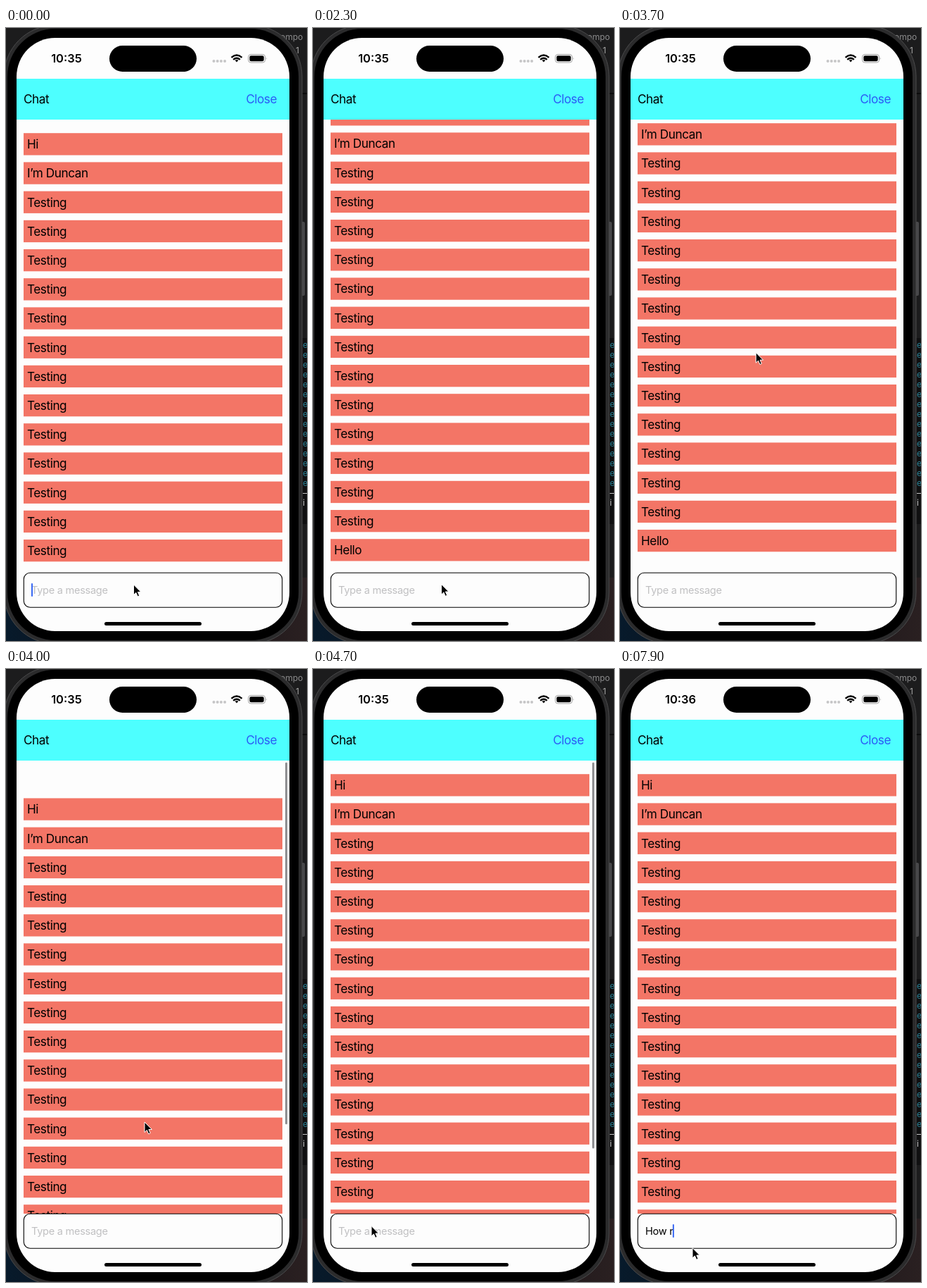
An HTML page for the animation above (8 s loop, 428x870 px).

```html
<!DOCTYPE html>
<html lang="en">
<head>
<meta charset="utf-8">
<title>Chat scroll</title>
<style>
  html, body { margin: 0; width: 100%; height: 100%; overflow: hidden; background: #1c1c1d; }
  svg { display: block; width: 428px; height: 870px; }
  text { white-space: pre; font-family: Inter, "Open Sans", sans-serif; }
  .body { font-size: 17.2px; letter-spacing: -.45px; }
  .field { font-size: 14.6px; letter-spacing: -.3px; }
  .clock { font-size: 16.5px; font-weight: 600; }
  .mono { font: 12px "Noto Sans Mono", "DejaVu Sans Mono", monospace; }
</style>
</head>
<body>
<svg id="stage" viewBox="0 0 428 870" xmlns="http://www.w3.org/2000/svg">
  <defs>
    <clipPath id="view"><rect x="15" y="130" width="388" height="643"/></clipPath>
    <linearGradient id="glow">
      <stop offset="0" stop-color="#071a2b"/>
      <stop offset=".5" stop-color="#120f14"/>
      <stop offset="1" stop-color="#2a2021"/>
    </linearGradient>
  </defs>

  <!-- desktop behind the phone -->
  <rect width="428" height="870" fill="#1c1c1d"/>
  <rect x="400" y="92" width="28" height="2" fill="#0c0c0c"/>
  <rect x="400" y="440" width="28" height="264" fill="#101011"/>
  <rect y="780" width="428" height="90" fill="url(#glow)"/>
  <g id="side" class="mono"></g>

  <!-- phone -->
  <rect x="419" y="275" width="6" height="105" rx="2" fill="#48484a"/>
  <rect x="-3" y="-4" width="424" height="878" rx="73" fill="#2b2b2c" stroke="#4a4a4b"/>
  <rect x="2" y="1" width="414" height="868" rx="68"/>
  <rect x="15" y="14" width="388" height="842" rx="55" fill="#fdfdfd"/>
  <rect x="147" y="25" width="124" height="37" rx="18.5"/>
  <text id="clock" class="clock" x="86" y="49" text-anchor="middle"></text>
  <g fill="#c6c6c7">
    <circle cx="295.5" cy="47" r="2"/><circle cx="300.7" cy="47" r="2"/>
    <circle cx="305.9" cy="47" r="2"/><circle cx="311.1" cy="47" r="2"/>
  </g>
  <g fill="none" stroke="#000" stroke-width="2.4">
    <path d="M320.5 41.8Q328 35.2 335.5 41.8"/>
    <path d="M323.2 44.8Q328 40.6 332.8 44.8"/>
    <path d="M325.6 45.8Q328 44.2 330.4 45.8L328 48.6Z" fill="#000" stroke="none"/>
  </g>
  <rect x="344.5" y="37.5" width="24" height="11.5" rx="3.6" fill="none" stroke="#a0a0a0"/>
  <rect x="346.3" y="39.3" width="20.4" height="7.9" rx="2.2"/>
  <path d="M369.8 41.3q1.8 1.9 0 3.9z" fill="#a0a0a0"/>

  <g clip-path="url(#view)">
    <g id="list"></g>
    <rect id="bar" x="397" y="132.5" width="3" rx="1.5" fill="#8f8f92"/>
  </g>

  <rect x="15" y="72" width="388" height="58" fill="#4dffff"/>
  <text class="body" x="25" y="107">Chat</text>
  <text class="body" x="385" y="107" text-anchor="end" fill="#2b5cf6">Close</text>

  <rect x="25.3" y="773.3" width="367.4" height="49" rx="9" fill="#fdfdfd" stroke="#000" stroke-width="1.1"/>
  <text id="hint" class="field" x="36" y="803" fill="#c0c0c2">Type a message</text>
  <text id="typed" class="field" x="36" y="803"></text>
  <rect id="caret" y="788" width="2" height="19" rx="1" fill="#3868f4"/>
  <rect x="140" y="843" width="138" height="5" rx="2.5"/>
  <path id="mouse" d="M0 0V14.5L3.4 11.4L5.7 16.8L8.2 15.7L5.9 10.5H10.4Z" stroke="#fff" stroke-width="1"/>
</svg>

<script>
const LOOP = 8000, STEP = 100, PITCH = 41.2;
const $ = id => document.getElementById(id);

function add(parent, tag, attrs, text = "") {
  const el = document.createElementNS("http://www.w3.org/2000/svg", tag);
  for (const key in attrs) el.setAttribute(key, attrs[key]);
  el.textContent = text;
  parent.append(el);
  return el;
}

const messages = ["Hi", "I’m Duncan", ...Array(13).fill("Testing"), "Hello"];
const rows = messages.map((message, i) => {
  const row = add($("list"), "g", { transform: `translate(25 ${149.2 + i * PITCH})` });
  add(row, "rect", { width: 368, height: 31.3, fill: "#f37566" });
  add(row, "text", { class: "body", x: 5, y: 22 }, message);
  return row;
});

add($("side"), "text", { x: 390, y: 17, fill: "#8b8b8c" }, "ompo");
add($("side"), "text", { x: 412, y: 36, fill: "#a8a8a8" }, "1");
for (let i = 0; i < 15; i++) add($("side"), "text", { x: 422, y: 454 + i * 14, fill: "#287f93" }, "e");
add($("side"), "text", { x: 422, y: 664, fill: "#c8c8c8" }, "—");
add($("side"), "text", { x: 422, y: 678, fill: "#c8c8c8" }, "i");

// time, then values
const scrollKeys = [[2000, 0], [2440, -55.2], [3700, -55.2], [3800, -32], [3900, 6], [4000, 34.2],
  [4100, 45], [4200, 29], [4300, 14], [4400, 6], [4500, 2], [4600, 0]];
const mouseKeys = [[0, 181.5, 790], [2300, 182.5, 789.5], [2900, 182.5, 790], [3500, 193, 409],
  [3650, 193, 450], [4000, 197, 643], [4150, 196, 685], [4700, 83, 790.5], [5000, 85, 792], [5500, 103, 821.5]];
const barKeys = [[3700, 0], [3800, 1], [4900, 1], [5200, 0]];
const edits = [[0, ""], [700, "H"], [900, "He"], [1100, "Hel"], [1200, "Hell"], [1400, "Hello"],
  [1900, ""], [4800, ""], [6100, "H"], [7500, "Ho"], [7600, "How"], [7700, "How "], [7800, "How r"]];

const smooth = p => p * p * (3 - 2 * p);

function at(keys, t, ease = p => p) {
  const n = keys.findIndex(key => key[0] > t);
  if (n === 0) return keys[0].slice(1);
  if (n < 0) return keys[keys.length - 1].slice(1);
  const a = keys[n - 1], b = keys[n], p = ease((t - a[0]) / (b[0] - a[0]));
  return a.slice(1).map((v, i) => v + (b[i + 1] - v) * p);
}

function draw(t) {
  const [shift] = at(scrollKeys, t, t < 2500 ? smooth : undefined);
  $("list").setAttribute("transform", `translate(0 ${shift})`);
  rows[15].style.display = t < 2000 ? "none" : "";

  const over = Math.max(0, shift), scrolled = Math.max(0, -shift);
  $("bar").setAttribute("height", 548 - over);
  $("bar").setAttribute("y", 132.5 + scrolled * .85);
  $("bar").setAttribute("opacity", at(barKeys, t)[0]);

  const [since, text] = edits.filter(edit => edit[0] <= t).pop();
  $("typed").textContent = text;
  $("hint").style.display = text ? "none" : "";
  const focused = t < 1900 || t >= 4800;
  $("caret").style.display = focused && (t - since) % 1000 < 600 ? "" : "none";
  $("caret").setAttribute("x", 36 + (text ? $("typed").getComputedTextLength() - .5 : 0));

  $("clock").textContent = t < 5200 ? "10:35" : "10:36";
  $("mouse").setAttribute("transform", `translate(${at(mouseKeys, t, smooth)})`);
}

const start = performance.now();
function tick() {
  const t = (performance.now() - start) % LOOP;
  draw(Math.floor(t / STEP) * STEP);
  requestAnimationFrame(tick);
}
tick();
</script>
</body>
</html>
```
